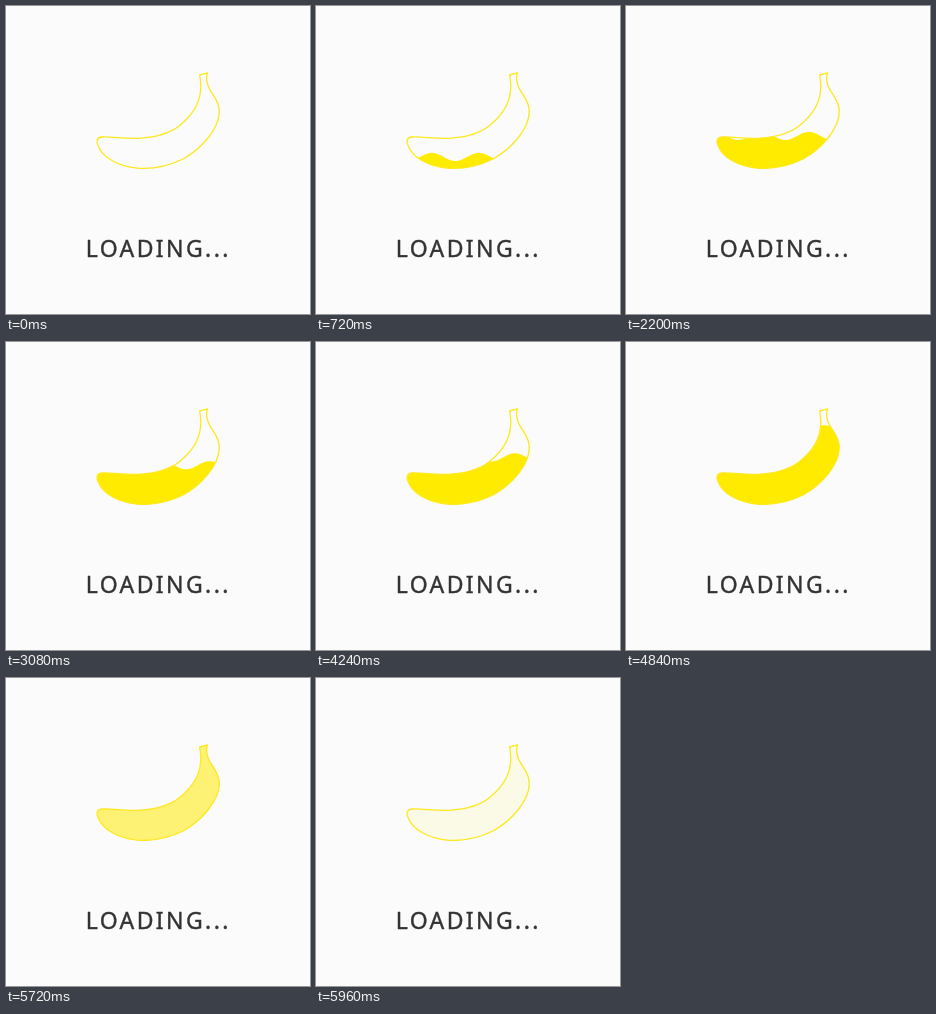
An HTML page for the animation above (6000 ms loop, 304 by 308 pixels).

```html
<!DOCTYPE html>
<html lang="en">
<head>
<meta charset="utf-8">
<title>Loading</title>
<style>
  html, body { margin: 0; width: 100%; height: 100%; overflow: hidden; background: #fbfbfb; }
  svg { display: block; width: 304px; height: 308px; }
  text {
    font: 23px "Noto Sans", sans-serif; letter-spacing: 2.4px;
    fill: #333; stroke: #333; stroke-width: 0.4px; stroke-linejoin: round;
  }
</style>
</head>
<body>
<svg viewBox="0 0 304 308">
  <defs>
    <path id="banana" d="M193.7 69 L201.5 66.8 C200 71 200.5 76 202.5 81 C206 89 213 94 213.3 105
      C213.5 123 195 143 177 153 C163 160 148 163 133 162.3 C112 161 96.5 151 92.3 140
      C90 135.5 90.5 131.5 96 131 C107 130.5 118 133 131 132.3 C150 131.5 163 128 173 120
      C187.5 108.5 194.5 97 194.7 82 C195 78 194.5 74 193.7 69Z"/>
    <clipPath id="inside"><use href="#banana"/></clipPath>
  </defs>
  <path id="liquid" clip-path="url(#inside)" fill="#ffeb00"/>
  <use href="#banana" fill="none" stroke="#ffe81c" stroke-width="1.3" stroke-linejoin="round"/>
  <text x="79.7" y="251">LOADING...</text>
</svg>
<script>
const LOOP = 6000, STEP = 40;
const WAVELENGTH = 47, AMPLITUDE = 4.1, DRIFT = 0.077;
const FADE_START = 5480;

// [time in ms, mean height of the liquid surface]
const levels = [
  [160, 168], [800, 148.5], [1280, 139.8], [2080, 131], [2720, 125.5],
  [3360, 121.5], [4000, 117.3], [4220, 116.3], [5400, 61]
];
const liquid = document.getElementById("liquid");

function levelAt(time) {
  if (time <= levels[0][0]) return 180;
  const next = levels.findIndex(([t]) => t >= time);
  if (next < 0) return 50;
  const [t0, y0] = levels[next - 1], [t1, y1] = levels[next];
  return y0 + (y1 - y0) * (time - t0) / (t1 - t0);
}

function wavePath(time) {
  const level = levelAt(time);
  const crest = 112 + DRIFT * (time - 1280);
  let d = "M85 175";
  for (let x = 85; x <= 220; x++) {
    const y = level - AMPLITUDE * Math.cos((x - crest) / WAVELENGTH * 2 * Math.PI);
    d += `L${x} ${y.toFixed(2)}`;
  }
  return d + "L220 175Z";
}

function draw(now) {
  const time = Math.floor(now % LOOP / STEP) * STEP;
  const fade = Math.max(0, (time - FADE_START) / (LOOP - FADE_START));
  liquid.setAttribute("d", wavePath(time));
  liquid.setAttribute("opacity", 1 - fade);
}

const start = performance.now();
function tick() {
  draw(performance.now() - start);
  requestAnimationFrame(tick);
}
tick();
</script>
</body>
</html>
```
